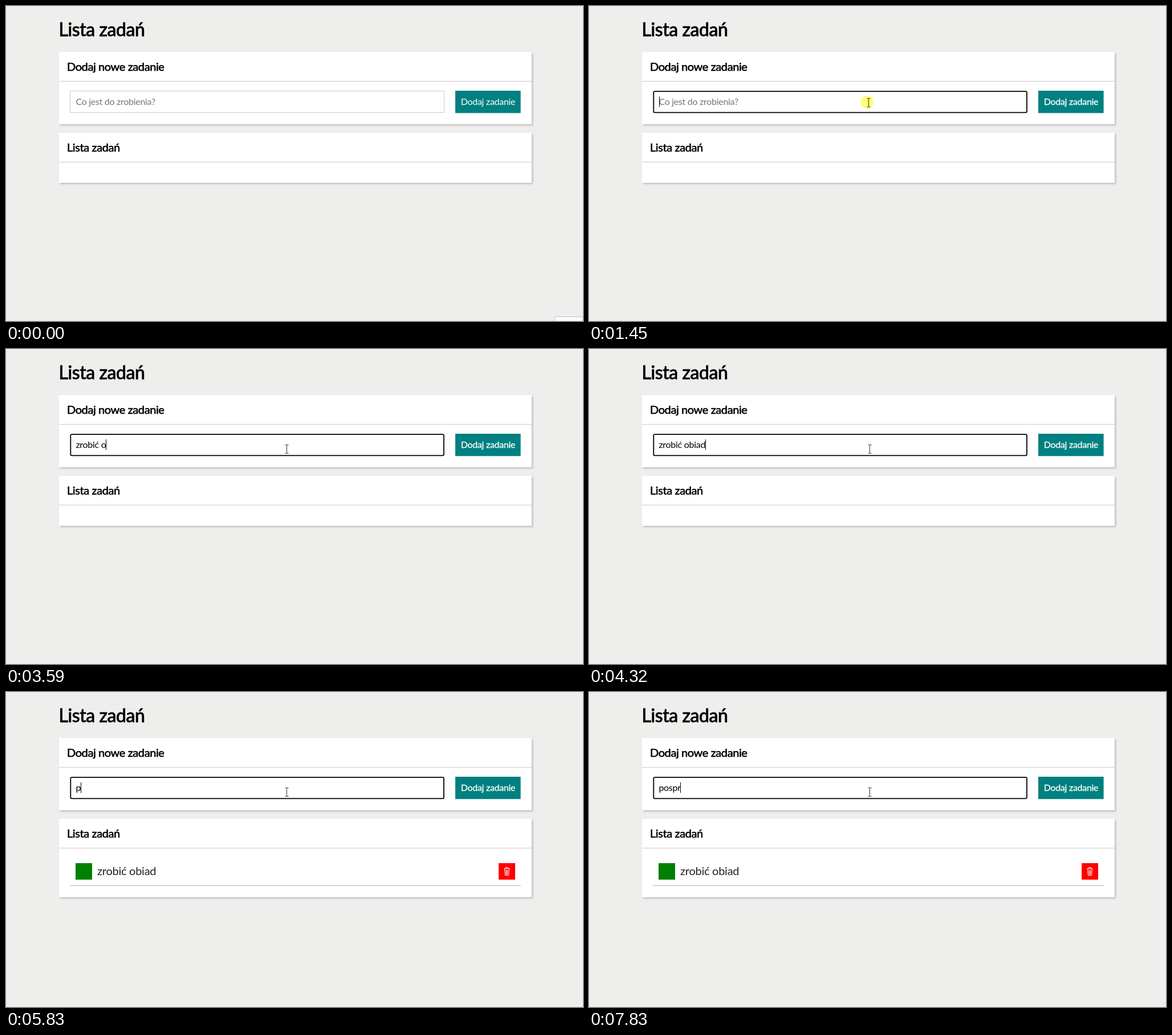
An HTML page that plays this animation: 1012 by 554 pixels, repeating every 8 s.

```html
<!DOCTYPE html>
<html lang="pl">
<head>
<meta charset="utf-8">
<title>Lista zadań</title>
<style>
  html, body { margin: 0; width: 100%; height: 100%; overflow: hidden; background: #eeeeec; }
  .card {
    position: absolute; left: 93px; width: 829px;
    background: #fff; box-shadow: 2px 2px 3px #bbb;
  }
  .card::before {
    content: ""; position: absolute; top: 51px; width: 100%; height: 1px; background: #ccc;
  }
  #add { top: 81px; height: 127px; }
  #list { top: 223px; height: 88px; }
  #list.filled { height: 138px; }
  svg { position: absolute; left: 0; top: 0; }
  text { font: 16px Lato, sans-serif; letter-spacing: -.018em; white-space: pre; }
  .bold { stroke: #000; stroke-width: .6px; }
  .h1 { font-size: 32px; letter-spacing: -.013em; stroke-width: .9px; }
  .h2 { font-size: 20px; letter-spacing: -.02em; }
  .task { font-size: 20px; letter-spacing: -.013em; fill: #222; }
</style>
</head>
<body>
<div class="card" id="add"></div>
<div class="card" id="list"></div>
<svg width="1012" height="554" viewBox="0 0 1012 554">
  <text class="bold h1" x="92.5" y="53">Lista zadań</text>
  <text class="bold h2" x="107" y="114">Dodaj nowe zadanie</text>
  <text class="bold h2" x="107" y="256">Lista zadań</text>

  <rect id="idle" x="112.5" y="149.5" width="656" height="38" fill="#fff" stroke="#ccc"/>
  <rect id="focus" x="113.3" y="150.2" width="654.6" height="37.1" rx="2" fill="#fff" stroke="#000" stroke-width="1.8"/>
  <text id="value" x="122.4" y="174"></text>
  <rect id="caret" y="159" width="1" height="18.5"/>

  <rect x="788" y="149" width="114.6" height="39.3" fill="#008080"/>
  <text id="button" x="845.5" y="174" text-anchor="middle" fill="#fff" stroke="#fff" stroke-width="0">Dodaj zadanie</text>

  <g id="item">
    <rect x="122" y="301" width="29" height="29" fill="#008000"/>
    <text class="task" x="160" y="322">zrobić obiad</text>
    <rect x="864" y="301" width="29" height="29" fill="#f00"/>
    <g fill="none" stroke="#fff">
      <path d="M873.5 310.5h10M876.5 310v-1.5h4v1.5M874.5 311l1 11.5h6l1-11.5"/>
      <path d="M876.8 312.5l.5 8.5M878.5 312.5v8.5M880.2 312.5l-.5 8.5" stroke-width=".8"/>
    </g>
    <rect x="112" y="340" width="791" height="1" fill="#b8b0b0"/>
  </g>

  <g id="popup">
    <path d="M962.5 554v-7.5H1012V554" fill="#f8f9fa" stroke="#bfc3c9"/>
  </g>

  <circle id="halo" cx="488" cy="169" r="11.5" fill="#ffff80"/>
  <path id="arrow" d="M.5.5v16l3.7-3.5 2.4 5.6 2.3-1-2.4-5.4h5.2z" fill="#fff" stroke="#000"/>
  <path id="beam" d="M-3-7.5h2.5l.5.5.5-.5H3M0-7V7M-3 7.5h2.5L0 7l.5.5H3" fill="none" stroke="#000" stroke-width=".8"/>
</svg>
<script>
  const LOOP = 8000, BLINK = 525;
  const FOCUS = 1450, SUBMIT = 4580;
  const $ = id => document.getElementById(id);
  const show = (id, on) => $(id).style.display = on ? '' : 'none';
  const place = (id, x, y) => $(id).setAttribute('transform', `translate(${x} ${y})`);

  // [time, field text, start of the caret blink if it differs]
  const keys = [
    [0, ''], [FOCUS, ''],
    [2260, 'z'], [2530, 'zr'], [2730, 'zro'], [2860, 'zrob'], [2990, 'zrobi'],
    [3190, 'zrobić'], [3390, 'zrobić '], [3590, 'zrobić o'], [3790, 'zrobić ob'],
    [3990, 'zrobić obi'], [4190, 'zrobić obia'], [4320, 'zrobić obiad'],
    [SUBMIT, '', 4315],
    [5830, 'p'], [5960, 'po'], [6110, 'pos'], [7100, 'posp', 7170], [7830, 'pospr']
  ];

  function pointer(t) {
    if (t >= 990) {
      const k = t < 1910 ? 0 : t < 1980 ? .4 : t < 2050 ? .8 : 1;
      return [490.5 + 2 * k, 170 + 6 * k];
    }
    const p = Math.floor((t - 520) / 78.4) / 6;
    const ease = p * (1.6 - .6 * p);
    return [604 - 113.5 * ease, 378 - 208 * ease].map(Math.round);
  }

  function drawField(t) {
    const [at, text, start = at] = keys.filter(k => k[0] <= t).pop();
    const value = $('value'), focused = t >= FOCUS;
    value.textContent = text || 'Co jest do zrobienia?';
    value.setAttribute('fill', text ? '#000' : '#757575');
    const width = text ? value.getComputedTextLength() : 0;
    $('caret').setAttribute('x', Math.max(123, Math.floor(122.4 + width)));
    const lit = t < start || Math.floor((t - start) / BLINK) % 2 === 0;
    show('caret', focused && lit);
    show('idle', !focused);
    show('focus', focused);
    $('button').setAttribute('stroke-width', focused ? .3 : 0);
  }

  function drawPointer(t) {
    const [x, y] = pointer(t), inField = y < 188;
    show('arrow', t >= 520 && !inField);
    show('beam', t >= 520 && inField);
    place('arrow', x, y);
    place('beam', x, y);
    show('halo', t >= FOCUS && t < 1580);
    $('halo').setAttribute('opacity', t < 1515 ? 1 : .5);
  }

  function draw(now) {
    const t = now % LOOP;
    drawField(t);
    drawPointer(t);
    show('popup', t < 70);
    show('item', t >= SUBMIT);
    $('list').classList.toggle('filled', t >= SUBMIT);
  }

  let begin;
  function tick(now) {
    begin ??= now;
    draw(now - begin);
    requestAnimationFrame(tick);
  }
  draw(0);
  requestAnimationFrame(tick);
</script>
</body>
</html>
```
